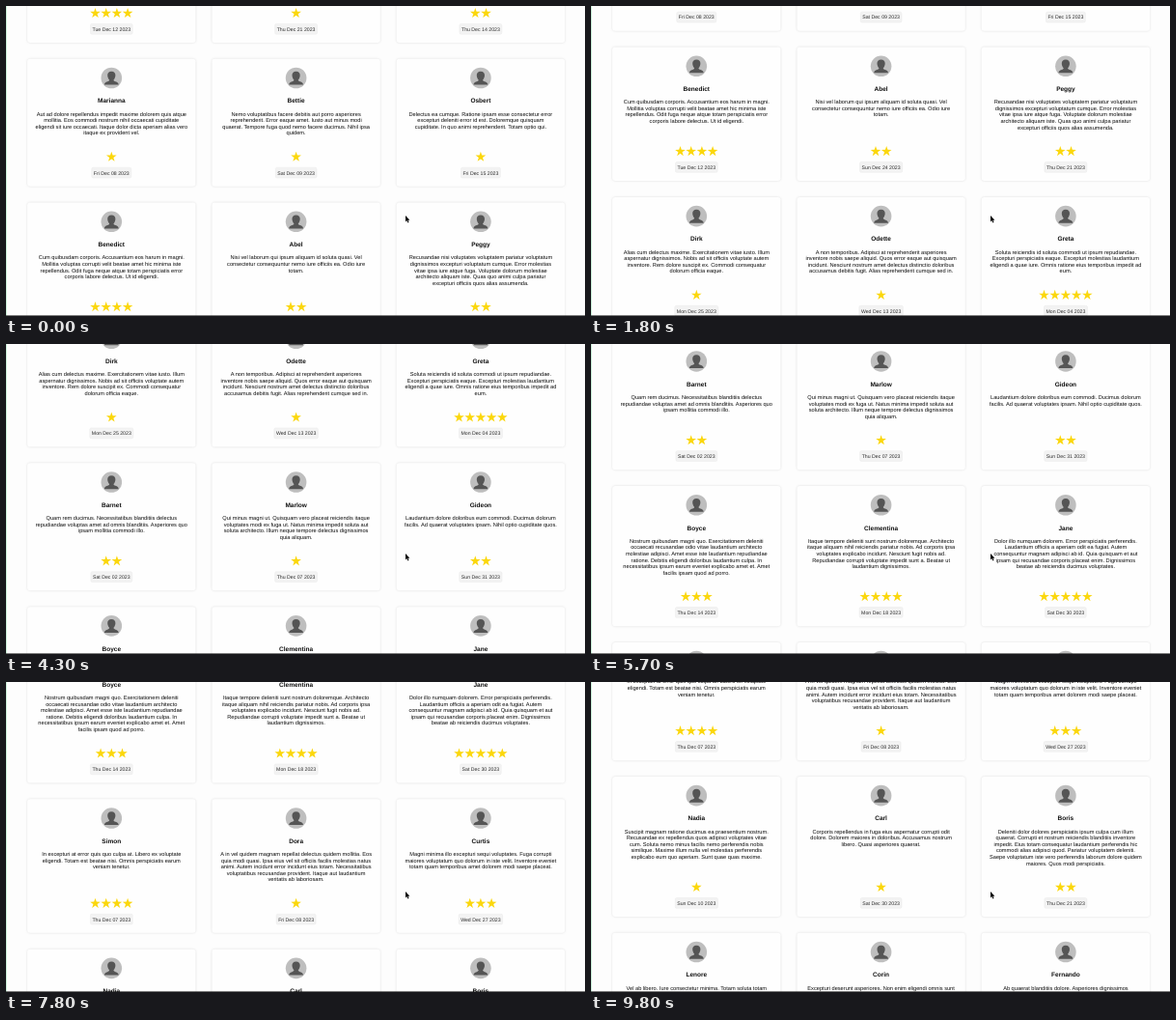
Animation, 600 px wide and 321 px high, one loop 9.9 s. Source, as an HTML page:

```html
<!DOCTYPE html>
<html lang="en">
<head>
<meta charset="utf-8">
<title>Review cards</title>
<style>
  html, body { margin: 0; width: 100%; height: 100%; overflow: hidden; background: #fdfdfd; }
  svg { display: block; width: 600px; height: 321px; }
  text { font-family: "Liberation Sans", Arial, sans-serif; text-anchor: middle; text-rendering: geometricPrecision; }
  .card { fill: #fefefe; filter: drop-shadow(0 .9px 1.2px rgba(0, 0, 0, .13)); }
  .name { font-size: 6.5px; font-weight: bold; fill: #111; }
  .body { font-size: 5.66px; fill: #0c0c0c; }
  .date { font-size: 5.2px; fill: #2b2b2b; }
  .chip { fill: #f3f3f3; stroke: #e8e8e8; stroke-width: .5px; }
  .star { fill: #fbd70c; }
</style>
</head>
<body>
<svg viewBox="0 0 600 321">
  <defs>
    <g id="avatar">
      <circle r="10.8" fill="#bebebe"/>
      <path fill="#555" d="M0-6.8C2.8-6.8 4.2-4.9 4.1-2.5C4-.7 3.2 1 2.2 2C2.2 3 2.8 3.3 4.2 3.8C6.2 4.5 7.2 5.2 7.4 7.1H-7.4C-7.2 5.2-6.2 4.5-4.2 3.8C-2.8 3.3-2.2 3-2.2 2C-3.2 1-4-.7-4.1-2.5C-4.2-4.9-2.8-6.8 0-6.8Z"/>
    </g>
  </defs>
  <g id="page"></g>
  <rect width="1" height="321" fill="#d2f6e0"/>
  <rect y="320" width="600" height="1" fill="#000" opacity=".5"/>
  <path d="M414 217V223.4L415.4 222.1L416.4 224.4L417.5 223.9L416.5 221.7H418.4Z" fill="#000" stroke="#fff" stroke-width=".7" paint-order="stroke"/>
</svg>
<script>
// Each card: name, star count, date, lines of text
const rows = [
  [
    ["", 4, "Tue Dec 12", ""],
    ["", 1, "Thu Dec 21", ""],
    ["", 2, "Thu Dec 14", ""]
  ], [
    ["Marianna", 1, "Fri Dec 08", "Aut ad dolore repellendus impedit maxime dolorem quis atque|mollitia. Eos commodi nostrum nihil occaecati cupiditate|eligendi sit iure occaecati. Itaque dolor dicta aperiam alias vero|itaque ex provident vel."],
    ["Bettie", 1, "Sat Dec 09", "Nemo voluptatibus facere debitis aut porro asperiores|reprehenderit. Error eaque amet. Iusto aut minus modi|quaerat. Tempore fuga quod nemo facere ducimus. Nihil ipsa|quidem."],
    ["Osbert", 1, "Fri Dec 15", "Delectus ea cumque. Ratione ipsam esse consectetur error|excepturi deleniti error id est. Doloremque quisquam|cupiditate. In quo animi reprehenderit. Totam optio qui."]
  ], [
    ["Benedict", 4, "Tue Dec 12", "Cum quibusdam corporis. Accusantium eos harum in magni.|Mollitia voluptas corrupti velit beatae amet hic minima iste|repellendus. Odit fuga neque atque totam perspiciatis error|corporis labore delectus. Ut id eligendi."],
    ["Abel", 2, "Sun Dec 24", "Nisi vel laborum qui ipsum aliquam id soluta quasi. Vel|consectetur consequuntur nemo iure officiis ea. Odio iure|totam."],
    ["Peggy", 2, "Thu Dec 21", "Recusandae nisi voluptates voluptatem pariatur voluptatum|dignissimos excepturi voluptatum cumque. Error molestias|vitae ipsa iure atque fuga. Voluptate dolorum molestiae|architecto aliquam iste. Quas quo animi culpa pariatur|excepturi officiis quos alias assumenda."]
  ], [
    ["Dirk", 1, "Mon Dec 25", "Alias cum delectus maxime. Exercitationem vitae iusto. Illum|aspernatur dignissimos. Nobis ad sit officiis voluptate autem|inventore. Rem dolore suscipit ex. Commodi consequatur|dolorum officia eaque."],
    ["Odette", 1, "Wed Dec 13", "A non temporibus. Adipisci at reprehenderit asperiores|inventore nobis saepe aliquid. Quos error eaque aut quisquam|incidunt. Nesciunt nostrum amet delectus distinctio doloribus|accusamus debitis fugit. Alias reprehenderit cumque sed in."],
    ["Greta", 5, "Mon Dec 04", "Soluta reiciendis id soluta commodi ut ipsum repudiandae.|Excepturi perspiciatis eaque. Excepturi molestias laudantium|eligendi a quae iure. Omnis ratione eius temporibus impedit ad|eum."]
  ], [
    ["Barnet", 2, "Sat Dec 02", "Quam rem ducimus. Necessitatibus blanditiis delectus|repudiandae voluptas amet ad omnis blanditiis. Asperiores quo|ipsam mollitia commodi illo."],
    ["Marlow", 1, "Thu Dec 07", "Qui minus magni ut. Quisquam vero placeat reiciendis itaque|voluptates modi ex fuga ut. Natus minima impedit soluta aut|soluta architecto. Illum neque tempore delectus dignissimos|quia aliquam."],
    ["Gideon", 2, "Sun Dec 31", "Laudantium dolore doloribus eum commodi. Ducimus dolorum|facilis. Ad quaerat voluptates ipsam. Nihil optio cupiditate quos."]
  ], [
    ["Boyce", 3, "Thu Dec 14", "Nostrum quibusdam magni quo. Exercitationem deleniti|occaecati recusandae odio vitae laudantium architecto|molestiae adipisci. Amet esse iste laudantium repudiandae|ratione. Debitis eligendi doloribus laudantium culpa. In|necessitatibus ipsum earum eveniet explicabo amet et. Amet|facilis ipsam quod ad porro."],
    ["Clementina", 4, "Mon Dec 18", "Itaque tempore deleniti sunt nostrum doloremque. Architecto|itaque aliquam nihil reiciendis pariatur nobis. Ad corporis ipsa|voluptates explicabo incidunt. Nesciunt fugit nobis ad.|Repudiandae corrupti voluptate impedit sunt a. Beatae ut|laudantium dignissimos."],
    ["Jane", 5, "Sat Dec 30", "Dolor illo numquam dolorem. Error perspiciatis perferendis.|Laudantium officiis a aperiam odit ea fugiat. Autem|consequuntur magnam adipisci ab id. Quia quisquam et aut|ipsam qui recusandae corporis placeat enim. Dignissimos|beatae ab reiciendis ducimus voluptates."]
  ], [
    ["Simon", 4, "Thu Dec 07", "In excepturi at error quis quo culpa at. Libero ex voluptate|eligendi. Totam est beatae nisi. Omnis perspiciatis earum|veniam tenetur."],
    ["Dora", 1, "Fri Dec 08", "A in vel quidem magnam repellat delectus quidem mollitia. Eos|quia modi quasi. Ipsa eius vel sit officiis facilis molestias natus|animi. Autem incidunt error incidunt eius totam. Necessitatibus|voluptatibus recusandae provident. Itaque aut laudantium|veritatis ab laboriosam."],
    ["Curtis", 3, "Wed Dec 27", "Magni minima illo excepturi sequi voluptates. Fuga corrupti|maiores voluptatum quo dolorum in iste velit. Inventore eveniet|totam quam temporibus amet dolorem modi saepe placeat."]
  ], [
    ["Nadia", 1, "Sun Dec 10", "Suscipit magnam ratione ducimus ea praesentium nostrum.|Recusandae ex repellendus quos adipisci voluptates vitae|cum. Soluta nemo minus facilis nemo perferendis nobis|similique. Maxime illum nulla vel molestias perferendis|explicabo eum quo aperiam. Sunt quae quas maxime."],
    ["Carl", 1, "Sat Dec 30", "Corporis repellendus in fuga eius aspernatur corrupti odit|dolore. Dolorem maiores in doloribus. Accusamus nostrum|libero. Quasi asperiores quaerat."],
    ["Boris", 2, "Thu Dec 21", "Deleniti dolor dolores perspiciatis ipsum culpa cum illum|quaerat. Corrupti et nostrum reiciendis blanditiis inventore|impedit. Eius totam consequatur laudantium perferendis hic|commodi alias adipisci quod. Pariatur voluptatem deleniti.|Saepe voluptatum iste vero perferendis laborum dolore quidem|maiores. Quos modi perspiciatis."]
  ], [
    ["Lenore", 2, "Mon Dec 11", "Vel ab libero. Iure consectetur minima. Totam soluta totam"],
    ["Corin", 3, "Tue Dec 19", "Excepturi deserunt asperiores. Non enim eligendi omnis sunt"],
    ["Fernando", 1, "Fri Dec 22", "Ab quaerat blanditiis dolore. Asperiores dignissimos"]
  ]
];

const LINE = 6.55, LOOP = 9900, STEP = 100;
const pageGroup = document.getElementById("page");

function add(tag, attrs, text) {
  const el = document.createElementNS("http://www.w3.org/2000/svg", tag);
  for (const key in attrs) el.setAttribute(key, attrs[key]);
  if (text) el.textContent = text;
  pageGroup.appendChild(el);
  return el;
}

function starPoints(cx, cy, r) {
  return Array.from({ length: 10 }, (_, i) => {
    const d = i % 2 ? r * 0.39 : r, a = i * Math.PI / 5;
    return (cx + d * Math.sin(a)).toFixed(2) + "," + (cy - d * Math.cos(a)).toFixed(2);
  }).join(" ");
}

// y is the centre of the avatar; extra is the height beyond four lines
function drawCard([name, stars, day, body], x, y, extra) {
  add("rect", { class: "card", x: x - 87.2, y: y - 19.7, width: 174.4, height: 132 + extra, rx: 3 });
  add("use", { href: "#avatar", x, y });
  add("text", { class: "name", x, y: y + 25.8 }, name);
  body.split("|").forEach((line, i) =>
    add("text", { class: "body", x, y: y + 39.1 + i * LINE }, line));

  const base = y + extra;
  for (let i = 0; i < stars; i++) {
    const cx = x + (i - (stars - 1) / 2) * 11.2;
    add("polygon", { class: "star", points: starPoints(cx, base + 81.8, 5.6) });
  }
  const chip = add("rect", { class: "chip", y: base + 92.7, height: 10.8, rx: 1.5 });
  const date = add("text", { class: "date", x, y: base + 100 }, day + " 2023");
  const width = date.getComputedTextLength() + 4;
  chip.setAttribute("x", x - width / 2);
  chip.setAttribute("width", width);
}

let rowY = -74.3;
for (const row of rows) {
  const lines = Math.max(4, ...row.map(card => card[3].split("|").length));
  const extra = (lines - 4) * LINE;
  row.forEach((card, i) => drawCard(card, 109.3 + i * 191.3, rowY, extra));
  rowY += 148.8 + extra;
}

// A brief stall at the start, then a steady scroll in 100 ms steps
function scrollAt(t) {
  const tick = Math.floor(t / STEP) * STEP;
  if (tick < 100) return 0;
  if (tick < 400) return 1;
  return 0.2 + tick * 0.08935;
}

const startTime = performance.now();
function draw() {
  const t = (performance.now() - startTime) % LOOP;
  pageGroup.setAttribute("transform", `translate(0 ${-scrollAt(t)})`);
  requestAnimationFrame(draw);
}
draw();
</script>
</body>
</html>
```
